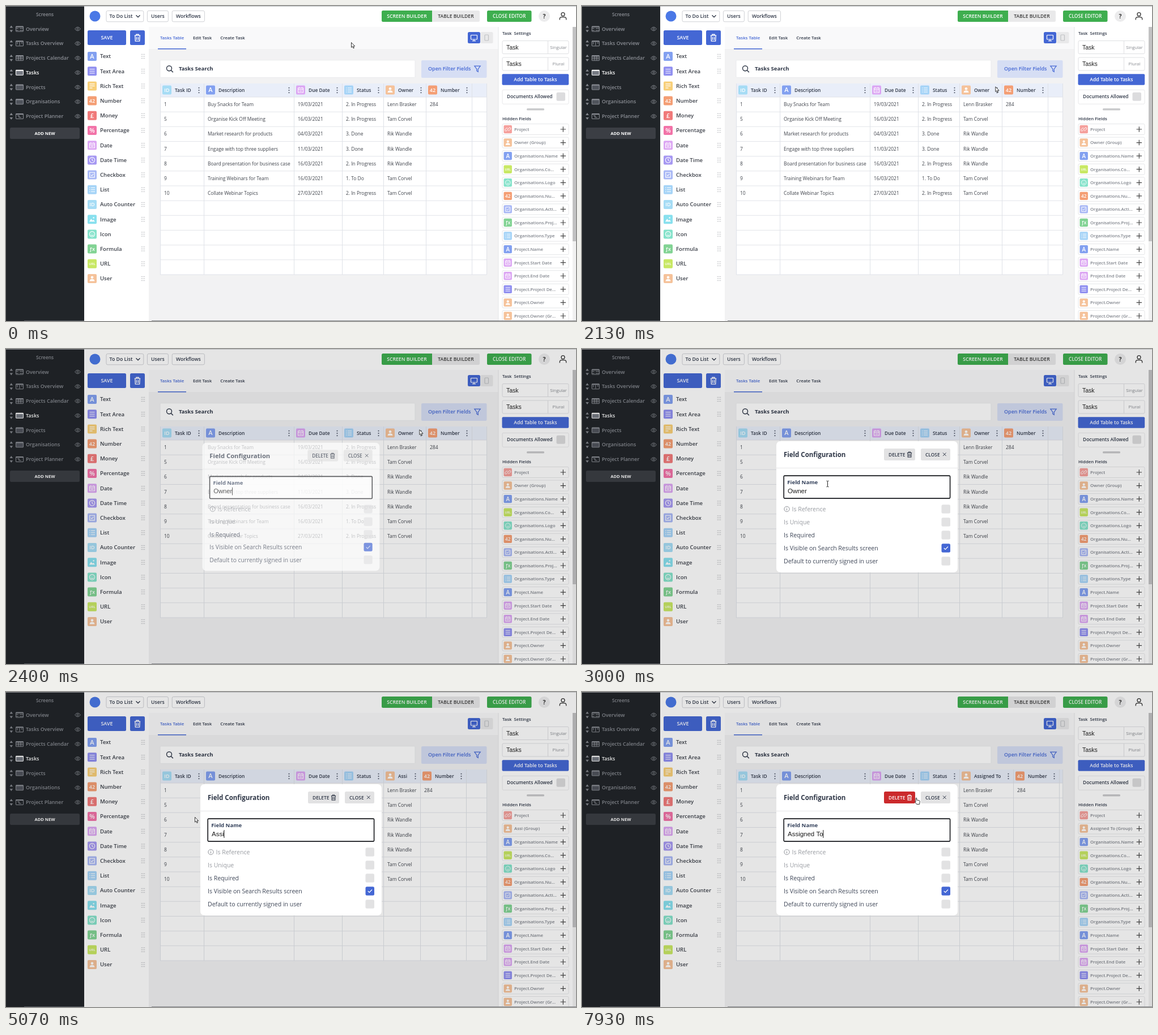
Recreate the animation shown at these times as an HTML page with a canvas. Size 1006 by 557 pixels, loop 8 s.

```html
<!DOCTYPE html>
<html lang="en">
<head>
<meta charset="utf-8">
<title>Screen builder</title>
<style>
html, body { margin: 0; width: 100%; height: 100%; overflow: hidden; background: #fff; }
canvas { display: block; width: 1006px; height: 557px; }
</style>
</head>
<body>
<canvas id="stage"></canvas>
<script>
const W = 1006, H = 557, LOOP = 8000;
const canvas = document.getElementById('stage');
const c = canvas.getContext('2d');
const dpr = window.devicePixelRatio || 1;
canvas.width = W * dpr;
canvas.height = H * dpr;

const SANS = '"Open Sans", "Noto Sans", sans-serif';
const ARIAL = '"Liberation Sans", Arial, sans-serif';
const BLUE = '#4467d4', GREEN = '#3eae4f', INK = '#2f3747', LINE = '#e2e4e9';
const REM = 9.58, INPUT = 1.2 * REM;

// ---------- drawing helpers ----------
function rect(x, y, w, h, fill, r = 0, stroke, lw = 1) {
  c.beginPath();
  c.roundRect(x, y, w, h, r);
  if (fill) { c.fillStyle = fill; c.fill(); }
  if (stroke) { c.strokeStyle = stroke; c.lineWidth = lw; c.stroke(); }
}
function path(d, stroke, lw = 1, fill) {
  const p = new Path2D(d);
  if (fill) { c.fillStyle = fill; c.fill(p); }
  if (stroke) { c.strokeStyle = stroke; c.lineWidth = lw; c.stroke(p); }
}
function dot(x, y, r, fill, stroke, lw = 1) {
  c.beginPath();
  c.arc(x, y, r, 0, 7);
  if (fill) { c.fillStyle = fill; c.fill(); }
  if (stroke) { c.strokeStyle = stroke; c.lineWidth = lw; c.stroke(); }
}
// y is the middle of the capitals
function text(s, x, y, size, color, weight = 600, align = 'left', family = SANS) {
  c.font = `${weight} ${size}px ${family}`;
  c.textAlign = align;
  c.fillStyle = color;
  c.fillText(s, x, y + size * 0.36);
}
function width(s, size, weight = 600, family = SANS) {
  c.font = `${weight} ${size}px ${family}`;
  return c.measureText(s).width;
}
function at(x, y, scale, draw) {
  c.save();
  c.translate(x, y);
  c.scale(scale, scale);
  draw();
  c.restore();
}

// ---------- field type icons on a 16 unit square ----------
const GLYPH = {
  lines: 'M3.5 4.5h9M3.5 8h9M3.5 11.5h9',
  rich: 'M3.5 4.5h9M3.5 8h9M3.5 11.5h5',
  date: 'M3.5 4.5h9v8h-9zM3.5 7h9M5.5 3v2M10.5 3v2M5.5 9.7h5',
  clock: 'M8 3.2a4.8 4.8 0 1 0 .01 0M8 5.2V8l2 1.5',
  check: 'M3.7 3.7h8.6v8.6H3.7zM5.7 8l1.7 1.7 3-3.4',
  list: 'M3 4.5h1.5M6 4.5h7M3 8h1.5M6 8h7M3 11.5h1.5M6 11.5h7',
  face: 'M8 3.2a4.8 4.8 0 1 0 .01 0M5.5 9q2.5 3 5 0M6 6.5h.8M9.2 6.5h.8',
  link: 'M7 9.2l-1.4 1.6a1.9 1.9 0 0 1-2.7-2.7l2-2a1.9 1.9 0 0 1 2.7 0M9 6.8l1.4-1.6a1.9 1.9 0 0 1 2.7 2.7l-2 2a1.9 1.9 0 0 1-2.7 0M6.5 9.5l3-3'
};
const TYPES = {
  text: ['#82a0f0', 'A'], area: ['#9190f0', 'lines'], rich: ['#f8cf78', 'rich'], num: ['#f49e74', '42'],
  money: ['#f07a7a', '£'], pct: ['#f273a8', '%'], date: ['#dca6f3', 'date'], time: ['#a698f2', 'clock'],
  check: ['#a9b8f5', 'check'], list: ['#a6d4f7', 'list'], id: ['#a6dcf5', 'ID'], image: ['#88e0ee', 'image'],
  icon: ['#84e2ca', 'face'], fx: ['#82d394', 'ƒx'], url: ['#c8e864', 'URL'], user: ['#f5c29a', 'user'],
  link: ['#f5a09c', 'link']
};
function icon(type, x, y, size) {
  const [color, g] = TYPES[type];
  at(x, y, size / 16, () => {
    rect(0, 0, 16, 16, color, 2);
    if (g === 'user') {
      dot(8, 5.8, 2.3, '#fff');
      path('M3.6 12.6q0-3.8 4.4-3.8t4.4 3.8z', null, 0, '#fff');
    } else if (g === 'image') {
      path('M3 12l3.3-5 2.4 3.2 1.4-1.6 2.9 3.4z', null, 0, '#fff');
      dot(10.6, 5.2, 1.2, '#fff');
    } else if (GLYPH[g]) path(GLYPH[g], '#fff', 1.1);
    else text(g, 8, 8, g.length > 2 ? 6 : g.length > 1 ? 9 : 11, '#fff', 600, 'center');
  });
}
const trash = (x, y, s, color) => at(x, y, s, () =>
  path('M-5-4H5M-2-4v-1.8h4V-4M-4-4l.5 9.5h7L4-4M-1.4-1.5v5M1.4-1.5v5', color, 1.3));
function plus(x, y) { path(`M${x - 4.7} ${y}h9.4M${x} ${y - 4.7}v9.4`, '#444', 1.2); }
function kebab(x, y) { for (let i = -1; i < 2; i++) dot(x, y + i * 4.2, 1.05, '#4b5263'); }
function button(s, x, y, w, h, size, fill, color, weight = 600, r = 2.5, stroke) {
  rect(x, y, w, h, fill, r, stroke);
  text(s, x + w / 2, y + h / 2, size, color, weight, 'center');
}

// ---------- page parts ----------
function sidebar() {
  rect(0, 0, 138, H, '#212529');
  text('Screens', 68.5, 14.5, 8.4, '#8d9097', 600, 'center');
  const rows = ['Overview', 'Tasks Overview', 'Projects Calendar', 'Tasks', 'Projects', 'Organisations', 'Project Planner'];
  const marks = ['M18 39.5h4M24 39.5h6M18 43h4M24 43h6', 'M20 38v4M24 38v6M28 38v3', 'M18 39.5h12M18 42h12M22 37v7M26 37v7'];
  rows.forEach((s, i) => {
    const y = 40.5 + i * 25.75, on = i === 3, color = on ? '#fff' : '#8b8e95';
    path(`M6.5 ${y - 2}l2.8-4 2.8 4zM6.5 ${y + 2}l2.8 4 2.8-4z`, null, 0, '#85888e');
    const solid = i > 2 && i < 6;
    rect(17.5, y - 4.5, 13, 9, solid ? (on ? '#777b84' : '#50545c') : null, 0.5, color, 1);
    path(`M17.5 ${y - 3.6}h13`, color, 1.6);
    c.save();
    c.translate(0, y - 40.5);
    if (i < 3) path(marks[i], color, 1.1);
    if (i === 6) path('M20 39.5h3v3h4', color, 1.2);
    c.restore();
    text(s, 35, y, 8.98, color);
    path(`M121.5 ${y}q5-6.5 10 0q-5 6.5-10 0z`, '#8b8e95', 0.9);
    dot(126.5, y, 1.5, null, '#8b8e95', 0.9);
  });
  button('ADD NEW', 7, 215, 123, 20, 7.6, '#3b3e44', '#fff', 700);
}

function header() {
  rect(138, 0, W - 138, 37, '#fff');
  dot(157, 18, 9.5, '#4a78e6');
  rect(177, 8.4, 65.8, 19.4, '#fff', 2.5, '#cfd1d5');
  text('To Do List', 182.6, 18, 8.75, INK);
  path('M229.5 16.2l3.5 3.6 3.5-3.6', INK, 1.3);
  button('Users', 249.4, 8.4, 37, 19.4, 8.7, '#fff', INK, 600, 2.5, '#cfd1d5');
  button('Workflows', 293.2, 8.4, 57.2, 19.4, 8.62, '#fff', INK, 600, 2.5, '#cfd1d5');
  button('SCREEN BUILDER', 663, 8, 89, 20, 8.62, GREEN, '#fff', 600, [2.5, 0, 0, 2.5]);
  button('TABLE BUILDER', 752, 8, 84, 20, 8.62, '#e9e9ea', '#3a3a3a', 600, [0, 2.5, 2.5, 0]);
  button('CLOSE EDITOR', 849, 8, 78.5, 20, 8.5, GREEN, '#fff');
  dot(950, 18, 10, '#ececed');
  text('?', 950, 18, 10.5, '#333', 700, 'center');
  dot(983, 14.7, 3, null, '#333', 1.3);
  path('M977.3 24.5v-1.6q0-3.2 3.4-3.2h4.6q3.4 0 3.4 3.2v1.6', '#333', 1.3);
}

const FIELDS = 'text:Text,area:Text Area,rich:Rich Text,num:Number,money:Money,pct:Percentage,date:Date,time:Date Time,check:Checkbox,list:List,id:Auto Counter,image:Image,icon:Icon,fx:Formula,url:URL,user:User';
const pairs = s => s.split(',').map(p => p.split(':'));
function palette() {
  rect(138, 37, 114, H - 37, '#fff');
  button('SAVE', 144, 43, 68, 26, 9, BLUE, '#fff');
  rect(219, 43, 26, 26, BLUE, 2.5);
  trash(232, 56.3, 1.05, '#fff');
  pairs(FIELDS).forEach(([type, s], i) => {
    const y = 89 + i * 26.2;
    icon(type, 144, y - 8, 16);
    text(s, 166, y, REM, '#3c4049');
    for (let k = 0; k < 9; k++) dot(239.4 + k % 3 * 2.5, y - 3.5 + Math.floor(k / 3) * 3.5, 0.75, '#b4b6ba');
  });
}

function tabs() {
  rect(252, 37, 617, H - 37, '#f2f2f3');
  rect(252, 37, 617, 39, '#f9f9fa');
  text('Tasks Table', 272, 56, 7.82, BLUE);
  text('Edit Task', 330, 56, 7.82, INK);
  text('Create Task', 378.3, 56, 7.82, INK);
  rect(268, 75, 50, 1.5, BLUE);
  rect(815, 46, 22, 20, BLUE, 2.5);
  rect(820.5, 51.5, 11, 7.5, null, 0.8, '#fff', 1.2);
  path('M826 59v2.5M823 61.7h6', '#fff', 1.2);
  rect(837.5, 46, 22, 20, '#e9e9ea', 2.5);
  rect(845, 51, 6.5, 10, null, 1, '#bfc1c4', 1.2);
  rect(272, 95.8, 450, 30.6, '#fff', 1.5, '#e6e7ea', 0.8);
  dot(288, 110.3, 4.5, null, INK, 1.4);
  path('M291.2 113.5l3.6 3.8', INK, 1.5);
  text('Tasks Search', 305, 111, REM, INK, 700);
  rect(733, 96, 115.5, 31, '#d6def4', 2);
  text('Open Filter Fields', 745, 111, 8.98, BLUE);
  path('M826.8 106.2h10.4l-4 5.2v5l-2.4-1.6v-3.4z', BLUE, 1.2);
}

const COLUMNS = 'id:Task ID,text:Description,date:Due Date,list:Status,user:Owner,num:Number';
const ROWS = [
  '1|Buy Snacks for Team|19/03/2021|2. In Progress|Lenn Brasker|284',
  '5|Organise Kick Off Meeting|16/03/2021|2. In Progress|Tam Corvel',
  '6|Market research for products|04/03/2021|3. Done|Rik Wandle',
  '7|Engage with top three suppliers|11/03/2021|3. Done|Rik Wandle',
  '8|Board presentation for business case|16/03/2021|2. In Progress|Rik Wandle',
  '9|Training Webinars for Team|16/03/2021|1. To Do|Tam Corvel',
  '10|Collate Webinar Topics|27/03/2021|2. In Progress|Tam Corvel'
].map(r => r.split('|'));

function table(name, ownerW) {
  const top = 161, rowH = 26.17, bottom = 475;
  const xs = [272, 349, 508, 593, 666, 666 + ownerW, 747 + ownerW];
  rect(272, 137, 576.5, bottom - 137, '#fff');
  rect(272, 137, 576.5, 24, '#e9eef9');
  for (let i = 0; i <= 12; i++) rect(272, top + i * rowH - 0.5, 576.5, 1, LINE);
  [...xs, 848].forEach(x => rect(x, 137, 1, bottom - 137, '#dfe2e8'));
  pairs(COLUMNS).forEach(([type, s], i) => {
    const x = xs[i];
    icon(type, x + 4, 140.5, 16);
    text(i === 4 ? name : s, x + 26, 149, 8.38, INK);
    kebab(xs[i + 1] - 8.5, 149);
  });
  ROWS.forEach((row, r) => row.forEach((s, i) => text(s, xs[i] + 7, 174 + r * rowH, 8.43, '#3f434b', 400)));
}

const HIDDEN = 'link:Project,user:,text:Organisations.Name,url:Organisations.Co...,icon:Organisations.Logo,num:Organisations.Nu...,check:Organisations.Acti...,fx:Organisations.Proj...,list:Organisations.Type,text:Project.Name,date:Project.Start Date,date:Project.End Date,area:Project.Project De...,user:Project.Owner,user:Project.Owner (Gr...';
function settings(name) {
  rect(869, 37, 131, H - 37, '#fff');
  rect(868.5, 37, 1, H - 37, '#e4e5e7');
  rect(1000, 37, 6, H - 37, '#f1f1f1');
  rect(1000, 37, 6, 379, '#c2c2c3');
  text('Task', 876, 48, 7.8, INK);
  text('Settings', 896.5, 48, 7.8, INK);
  [['Task', 'Singular', 73], ['Tasks', 'Plural', 102.5]].forEach(([s, hint, y]) => {
    rect(876, y - 11.5, 117, 23, '#fff', 2, '#dfe0e3');
    rect(956, y - 11.5, 1, 23, '#dfe0e3');
    text(s, 883, y, 1.1 * REM, '#222', 400, 'left', ARIAL);
    text(hint, 975, y, 7.8, '#85888e', 400, 'center');
  });
  button('Add Table to Tasks', 875.5, 120.3, 117.7, 19.4, 8.62, BLUE, '#fff', 600, 2);
  rect(876, 148.3, 117, 25, '#fff', 2, '#e8e8ea');
  text('Documents Allowed', 884, 160.2, 8.38, INK);
  rect(971.5, 152.8, 15.5, 15, '#dcdcde', 2.5);
  rect(919, 181, 31, 3.5, '#c9cacc', 1.5);
  text('Hidden Fields', 876, 199, 7.8, INK);
  pairs(HIDDEN).forEach(([type, s], i) => {
    const y = 218 + i * 23.57;
    rect(876, y - 9.5, 117, 19, '#fff', 2, '#e5e6e8');
    icon(type, 878.5, y - 7.2, 14.4);
    text(s || name + ' (Group)', 897, y, 7.78, '#7f838b');
    plus(983.3, y);
  });
}

// ---------- dialog ----------
function dialog(value, caret, selectFrom, hot) {
  rect(343, 163, 320, 232, '#fff', 7);
  text('Field Configuration', 356, 186.7, 1.2 * REM, INK, 700);
  rect(533, 176, 55, 21, hot ? '#cb2a2c' : '#e2e2e3', 2.5);
  text('DELETE', 541, 186.5, 8.38, hot ? '#fff' : INK);
  trash(578, 186.8, 0.82, hot ? '#fff' : INK);
  rect(598, 176, 52, 21, '#e2e2e3', 2.5);
  text('CLOSE', 606, 186.5, 8.38, INK);
  path('M637 183.5l5.6 5.6M642.6 183.5l-5.6 5.6', INK, 1);
  rect(343, 210, 320, 1, '#e6e6e8');
  rect(356.2, 224.1, 293.4, 40, '#fff', 1.5, '#15171b', 1.6);
  text('Field Name', 362.3, 235.8, REM, '#33405a', 700);

  const x = 363, w = width(value, INPUT, 400, ARIAL);
  text(value, x, 250.8, INPUT, '#1b1b1b', 400, 'left', ARIAL);
  if (selectFrom < value.length) {
    const from = x + width(value.slice(0, selectFrom), INPUT, 400, ARIAL);
    rect(from, 244, x + w - from, 14, '#1e90ff');
    text(value.slice(selectFrom), from, 250.8, INPUT, '#fff', 400, 'left', ARIAL);
  }
  if (caret) rect(x + w - 0.2, 244, 0.9, 14, '#000');

  ['Is Reference', 'Is Unique', 'Is Required', 'Is Visible on Search Results screen', 'Default to currently signed in user'].forEach((s, i) => {
    const y = 283 + i * 23, info = i === 0, on = i === 3;
    if (info) {
      dot(361.5, y, 4.6, null, '#8d9097', 1);
      path(`M361.5 ${y - 0.7}v3.2M361.5 ${y - 2.8}v1.1`, '#8d9097', 1.1);
    }
    text(s, info ? 370.5 : 356, y, 1.1 * REM, i < 2 ? '#989ba1' : '#3e4657', 400);
    rect(634.5, y - 7.7, 15.5, 15.4, on ? BLUE : '#e2e2e3', 2.5);
    if (on) path(`M638.8 ${y}l2.5 2.5 4.6-5`, '#fff', 1.2);
  });
}

// ---------- pointer ----------
// time, x, y
const MOVES = [
  [200, 609.5, 64.5], [1000, 719, 124], [1070, 719, 124], [1300, 730, 145], [1400, 729.8, 142.8],
  [2820, 729.8, 142.8], [3000, 433.5, 238.5], [3330, 389.5, 264.8], [3560, 389.5, 264.8],
  [3800, 407, 257], [4040, 407, 257], [4330, 333.5, 221.3], [7480, 333.5, 221.3], [7930, 590, 187]
];
const smooth = p => p * p * (3 - 2 * p);
function pointerAt(t) {
  const i = MOVES.findIndex(m => m[0] > t);
  if (i === 0) return MOVES[0].slice(1);
  if (i < 0) return MOVES[MOVES.length - 1].slice(1);
  const [t0, x0, y0] = MOVES[i - 1], [t1, x1, y1] = MOVES[i];
  const p = smooth((t - t0) / (t1 - t0));
  return [x0 + (x1 - x0) * p, y0 + (y1 - y0) * p];
}
function pointer(x, y, kind) {
  at(x, y, 1, () => {
    if (kind === 'beam') {
      const d = 'M-2-5.3q2 0 2 1.2q0-1.2 2-1.2M0-4.2v8.4M-2 5.3q2 0 2-1.2q0 1.2 2 1.2';
      path(d, '#fff', 2.2);
      path(d, '#222', 1);
    } else if (kind === 'hand') {
      path('M-.9 7V.8q.9-1.5 1.8 0V4l4.4 1q1 .3 1 1.4L5.6 11.5H.6L-2.2 7.4q-.3-1.2 1.3-.4z', '#222', 0.9, '#fff');
    } else path('M0 0V8.8L2 7l1.5 3.3 1.4-.6L3.5 6.5H6.2z', '#222', 0.9, '#fff');
  });
}

// ---------- timeline ----------
const KEYS = [4670, 4870, 4970, 5070, 5200, 5330, 5430, 5530, 5730, 6070, 6400];
const NEW_NAME = 'Assigned To', OPEN = 2130, DRAG = 4060;
const clamp = v => Math.max(0, Math.min(1, v));

function ownerWidth(t, name) {
  if (t < KEYS[1]) return 75;
  if (t >= KEYS[9]) return 95;
  return Math.max(65, 48 + Math.round(width(name.trim(), 8.38)));
}
function render(t) {
  const typed = KEYS.filter(k => k <= t).length;
  const value = typed ? NEW_NAME.slice(0, typed) : 'Owner';
  const [mx, my] = pointerAt(t);

  c.setTransform(dpr, 0, 0, dpr, 0, 0);
  c.clearRect(0, 0, W, H);
  sidebar();
  header();
  palette();
  tabs();
  table(value, ownerWidth(t, value));
  settings(value);

  const open = t >= OPEN;
  const hot = t > 7480 && mx > 533 && mx < 594 && my < 198;
  if (open) {
    rect(0, 0, W, H, `rgba(0,0,0,${0.1 * clamp((t - OPEN) / 60)})`);
    const p = clamp((t - 2180) / 320);
    const scale = 0.9 + 0.1 * smooth(p);
    const dragging = t >= DRAG && !typed;
    let from = value.length;
    if (dragging) while (from > 0 && 363 + width(value.slice(0, from), INPUT, 400, ARIAL) > mx + 2) from--;
    const base = typed ? KEYS[typed - 1] : 2200;
    const caret = !dragging && t >= 2200 && (t - base) % 1066 < 530;
    c.save();
    c.globalAlpha = p;
    c.translate(503, 279);
    c.scale(scale, scale);
    c.translate(-503, -279);
    if (p > 0) dialog(value, caret, from, hot);
    c.restore();
  }
  rect(0, 0, W, 0.7, '#a9abae');
  rect(32, 556, 106, 1, '#55585e');
  rect(257, 556, W - 257, 1, '#85878b');

  const inField = open && mx > 356 && mx < 650 && my > 224 && my < 264.3;
  pointer(mx, my, hot ? 'hand' : inField ? 'beam' : 'arrow');
}

const start = performance.now();
function tick() {
  render((performance.now() - start) % LOOP);
  requestAnimationFrame(tick);
}
tick();
</script>
</body>
</html>
```
